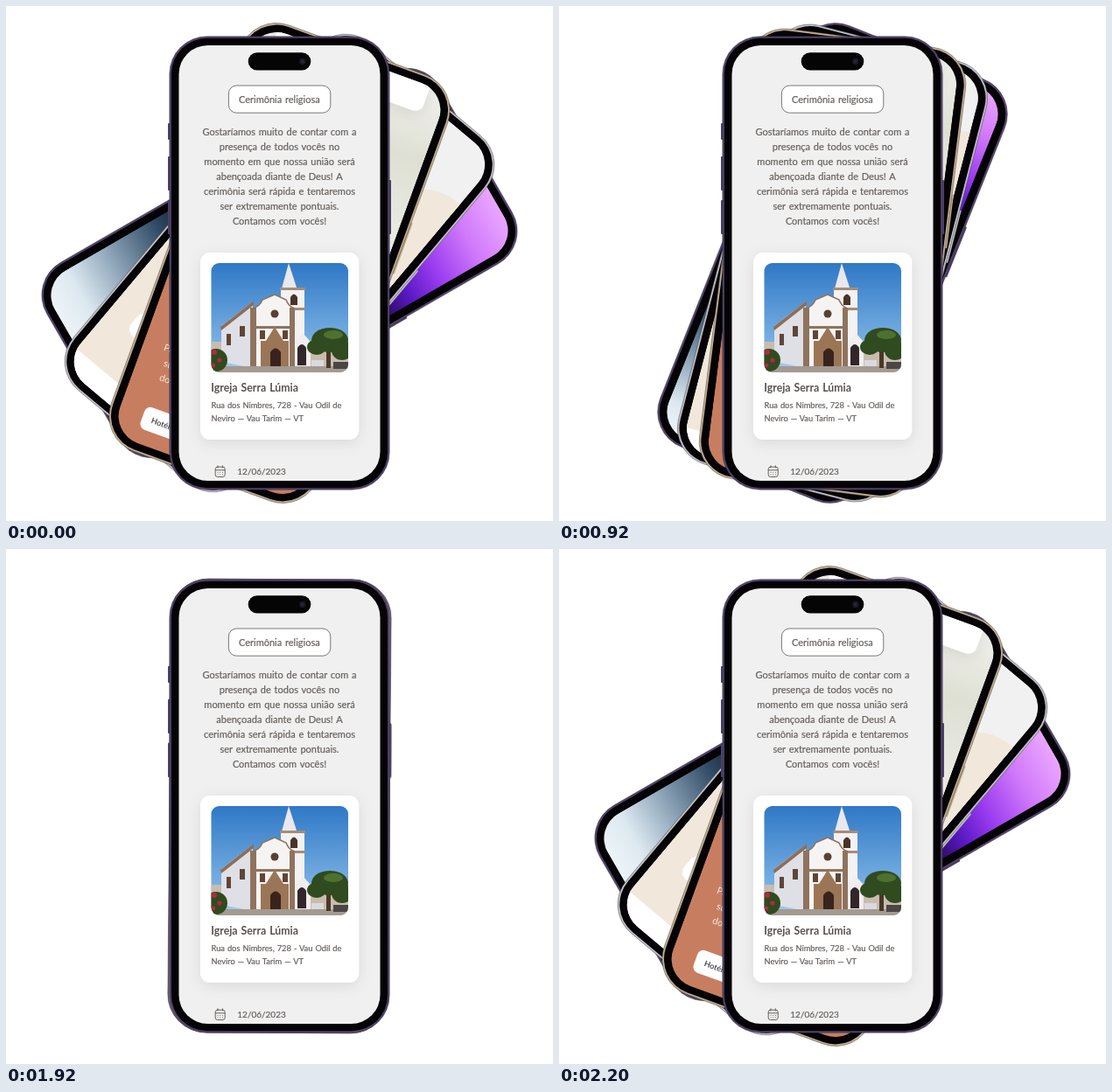
An HTML page that plays this animation: 625 px wide and 589 px high, repeating every 2300 ms.

```html
<!DOCTYPE html>
<html lang="pt">
<head>
<meta charset="utf-8">
<title>Convite</title>
<style>
  html, body { margin: 0; width: 100%; height: 100%; overflow: hidden; background: #fff; }
  svg { display: block; width: 100vw; height: 100vh; }
  text { font-family: Lato, "Open Sans", sans-serif; font-size: 11px; word-spacing: 1px; fill: #65605d; stroke: #65605d; stroke-width: .2px; }
  .mid { text-anchor: middle; }
  .title { font-size: 12.3px; font-weight: 700; fill: #57524f; stroke: none; }
  .small { font-size: 9.3px; word-spacing: .6px; }
  .date { font-size: 10px; }
  .light { fill: #f7e6dc; stroke: none; }
  .tag { font-size: 9px; font-weight: 700; fill: #4b4a52; stroke: none; }
  .purple { color: #51446a; }
  .gold { color: #c0ae8e; }
  .silver { color: #bfbfc3; }
  .card { filter: drop-shadow(0 4px 8px rgba(0, 0, 0, .09)); }
</style>
</head>
<body>
<svg viewBox="0 0 625 589">
  <defs>
    <g id="body">
      <g fill="currentColor">
        <rect x="-127.5" y="-160" width="3" height="19" rx="1"/>
        <rect x="-127.5" y="-122" width="3" height="39" rx="1"/>
        <rect x="-127.5" y="-72" width="3" height="39" rx="1"/>
        <rect x="124.5" y="-95" width="3" height="62" rx="1"/>
      </g>
      <rect x="-125.7" y="-259.3" width="251.4" height="518.6" rx="43" fill="currentColor" stroke="#2b2435" stroke-opacity=".55" stroke-width=".7"/>
      <rect x="-123.6" y="-257.2" width="247.2" height="514.4" rx="41" fill="#050306"/>
    </g>
    <clipPath id="screen"><rect x="-115" y="-249" width="230" height="498" rx="33"/></clipPath>
    <clipPath id="photo"><rect x="234.5" y="294" width="156.5" height="125" rx="9"/></clipPath>
    <linearGradient id="wall" x1="0" y1="0" x2="0" y2="1">
      <stop offset="0" stop-color="#eaa6ff"/>
      <stop offset=".1" stop-color="#d078fa"/>
      <stop offset=".2" stop-color="#9a3cf0"/>
      <stop offset=".28" stop-color="#5a18c4"/>
      <stop offset=".36" stop-color="#23094f"/>
      <stop offset=".62" stop-color="#12202f"/>
      <stop offset=".7" stop-color="#2f4a64"/>
      <stop offset=".83" stop-color="#90a7ba"/>
      <stop offset=".93" stop-color="#dce8f0"/>
      <stop offset="1" stop-color="#edf4f8"/>
    </linearGradient>
    <linearGradient id="sage" x1="0" y1="0" x2="0" y2="1">
      <stop offset="0" stop-color="#f0f0ec"/>
      <stop offset=".35" stop-color="#dfe0d4"/>
      <stop offset="1" stop-color="#f0f0ea"/>
    </linearGradient>
    <linearGradient id="sky" x1="0" y1="0" x2="0" y2="1">
      <stop offset="0" stop-color="#2f78c6"/>
      <stop offset=".75" stop-color="#7db3e4"/>
      <stop offset="1" stop-color="#a9cdec"/>
    </linearGradient>
  </defs>

  <g class="fan purple" data-angle="60">
    <use href="#body"/>
    <g clip-path="url(#screen)">
      <rect x="-115" y="-249" width="230" height="498" fill="url(#wall)"/>
    </g>
  </g>

  <g class="fan silver" data-angle="40">
    <use href="#body"/>
    <g clip-path="url(#screen)">
      <rect x="-115" y="-249" width="230" height="498" fill="#f1f1f1"/>
      <path d="M-115 -150H58Q74 -185 115 -184V224H-115Z" fill="#f1e8db"/>
      <rect x="-115" y="224" width="230" height="26" fill="#fff"/>
      <rect x="-85" y="141" width="170" height="31" rx="10" fill="#fff"/>
    </g>
  </g>

  <g class="fan gold" data-angle="20">
    <use href="#body"/>
    <g clip-path="url(#screen)">
      <rect x="-115" y="-249" width="230" height="240" fill="url(#sage)"/>
      <rect class="card" x="-93" y="-270" width="186" height="54" rx="10" fill="#fff"/>
      <rect x="-115" y="-10" width="230" height="260" fill="#c77e60"/>
      <text class="light" x="-91" y="139">Para seu conforto, separamos</text>
      <text class="light" x="-85" y="156">sugestões de hospedagem</text>
      <text class="light" x="-84" y="173">dos mais variados preços</text>
      <rect x="-87" y="205" width="62" height="27" rx="7" fill="#fff"/>
      <text class="tag" x="-76" y="222">Hotéis</text>
    </g>
  </g>

  <g class="purple" transform="translate(312.5 294)">
    <use href="#body"/>
    <rect x="-115" y="-249" width="230" height="498" rx="33" fill="#f0f0f0"/>
  </g>
  <rect x="276.7" y="53.3" width="71.6" height="20.2" rx="10.1" fill="#060506"/>
  <circle cx="338.8" cy="63.4" r="3.6" fill="#1b1a22"/>
  <circle cx="338.8" cy="63.4" r="1.4" fill="#2d2c40"/>

  <rect x="254.4" y="91" width="116.4" height="31.2" rx="9" fill="#fff" stroke="#6e6a68" stroke-width=".9"/>
  <text class="mid" x="312.3" y="110.8">Cerimônia religiosa</text>
  <g id="para"></g>

  <rect class="card" x="222" y="282" width="181.3" height="214" rx="11" fill="#fff"/>
  <g clip-path="url(#photo)">
    <rect x="234" y="294" width="158" height="126" fill="url(#sky)"/>
    <path d="M234 384H252V412H234ZM345 384L368 376L392 382V412H345Z" fill="#c9bcae"/>
    <path d="M323 294L314.5 325H333Z" fill="#e9e8ee"/>
    <path d="M314 323H341V400H314Z" fill="#f3f1f2"/>
    <path d="M313 322H342V325H313ZM314 345H342V348H314Z" fill="#a58c78"/>
    <path d="M325 342V333Q329 326 333 333V342Z" fill="#4a3328"/>
    <path d="M246 366L282 338V414L246 407Z" fill="#dfdfe6"/>
    <path d="M245 367L283 337V342L246 371Z" fill="#8d6e58"/>
    <path d="M252 375H257V388H252ZM267 366H273V378H267Z" fill="#5d4638"/>
    <path d="M281 346Q290 344 293 336L307 330L320 336Q323 344 330 346V414H281Z" fill="#f6f4f3"/>
    <path d="M279 345H286V414H279ZM324 345H330V414H324ZM281 366H330V369H281Z" fill="#8f735d"/>
    <path d="M281 346Q290 344 293 336L307 330L320 336Q323 344 330 346" fill="none" stroke="#8f735d" stroke-width="1.6"/>
    <circle cx="307" cy="352" r="4.5" fill="#5a4032"/>
    <path d="M291 414V383H297L307 367L317 383H323V414Z" fill="#9a7656"/>
    <path d="M302 414V396Q308 387 314 396V414Z" fill="#38241c"/>
    <path d="M290 371H296V381H290ZM316 371H322V381H316Z" fill="#5f4636"/>
    <path d="M330 384L339 374L348 384V413H330Z" fill="#f0eeee"/>
    <path d="M333 411V391Q338 383 343 391V411Z" fill="#33262a"/>
    <rect x="234" y="412" width="158" height="8" fill="#a39a91"/>
    <path d="M366 390H371V414H366Z" fill="#4a3826"/>
    <g fill="#2f4b1f">
      <ellipse cx="370" cy="382" rx="21" ry="14"/>
      <ellipse cx="355" cy="390" rx="11" ry="9"/>
      <ellipse cx="384" cy="394" rx="12" ry="11"/>
      <ellipse cx="240" cy="405" rx="13" ry="13"/>
    </g>
    <ellipse cx="374" cy="376" rx="11" ry="5" fill="#4f7130"/>
    <g fill="#b3293f">
      <circle cx="238" cy="396" r="3"/><circle cx="244" cy="405" r="2.6"/><circle cx="237" cy="411" r="2.4"/>
    </g>
    <path d="M349 405H363V412H349Z" fill="#d9dade"/>
    <path d="M374 407H391V415H374Z" fill="#4c4644"/>
  </g>
  <text class="title" x="234.3" y="441">Igreja Serra Lúmia</text>
  <text class="small" x="234.5" y="459.6">Rua dos Nimbres, 728 - Vau Odil de</text>
  <text class="small" x="234.5" y="474.6">Neviro — Vau Tarim — VT</text>

  <g fill="none" stroke="#68635f" stroke-linecap="round">
    <rect x="239.2" y="527.2" width="11" height="11.3" rx="2.4"/>
    <path d="M239.2 530.8H250.2M242 525.8V528M247.4 525.8V528"/>
    <path d="M242 533.4H247.6M242 535.9H247.6" stroke-dasharray=".1 2.6"/>
  </g>
  <text class="date" x="264.3" y="536.4">12/06/2023</text>
</svg>
<script>
const LOOP = 2300, TICK = 40;
const CLOSE = { start: 757, length: 400, curve: [.3, .16, .33, 1] };
const OPEN = { start: 1900, length: 300, curve: [.42, 0, .58, 1] };

const lines = [
  'Gostaríamos muito de contar com a', 'presença de todos vocês no',
  'momento em que nossa união será', 'abençoada diante de Deus! A',
  'cerimônia será rápida e tentaremos', 'ser extremamente pontuais.',
  'Contamos com vocês!'
];
document.getElementById('para').innerHTML = lines.map((line, i) =>
  `<text class="mid" x="312.5" y="${147.6 + i * 17.1}">${line}</text>`).join('');

const bezier = (a, b, s) => 3 * a * s * (1 - s) ** 2 + 3 * b * s * s * (1 - s) + s ** 3;

function progress(time, { start, length, curve: [x1, y1, x2, y2] }) {
  const x = (time - start) / length;
  if (x <= 0) return 0;
  if (x >= 1) return 1;
  let low = 0, high = 1;
  for (let i = 0; i < 24; i++) {
    const mid = (low + high) / 2;
    if (bezier(x1, x2, mid) < x) low = mid; else high = mid;
  }
  return bezier(y1, y2, low);
}

const fan = [...document.querySelectorAll('.fan')];

function draw(elapsed) {
  const time = Math.floor((elapsed % LOOP) / TICK) * TICK;
  const spread = 1 - progress(time, CLOSE) + progress(time, OPEN);
  for (const phone of fan) {
    phone.setAttribute('transform', `translate(312.5 294) rotate(${phone.dataset.angle * spread})`);
    phone.setAttribute('visibility', spread > .003 ? 'visible' : 'hidden');
  }
}

const begin = performance.now();
function loop() {
  draw(performance.now() - begin);
  requestAnimationFrame(loop);
}
loop();
</script>
</body>
</html>
```
